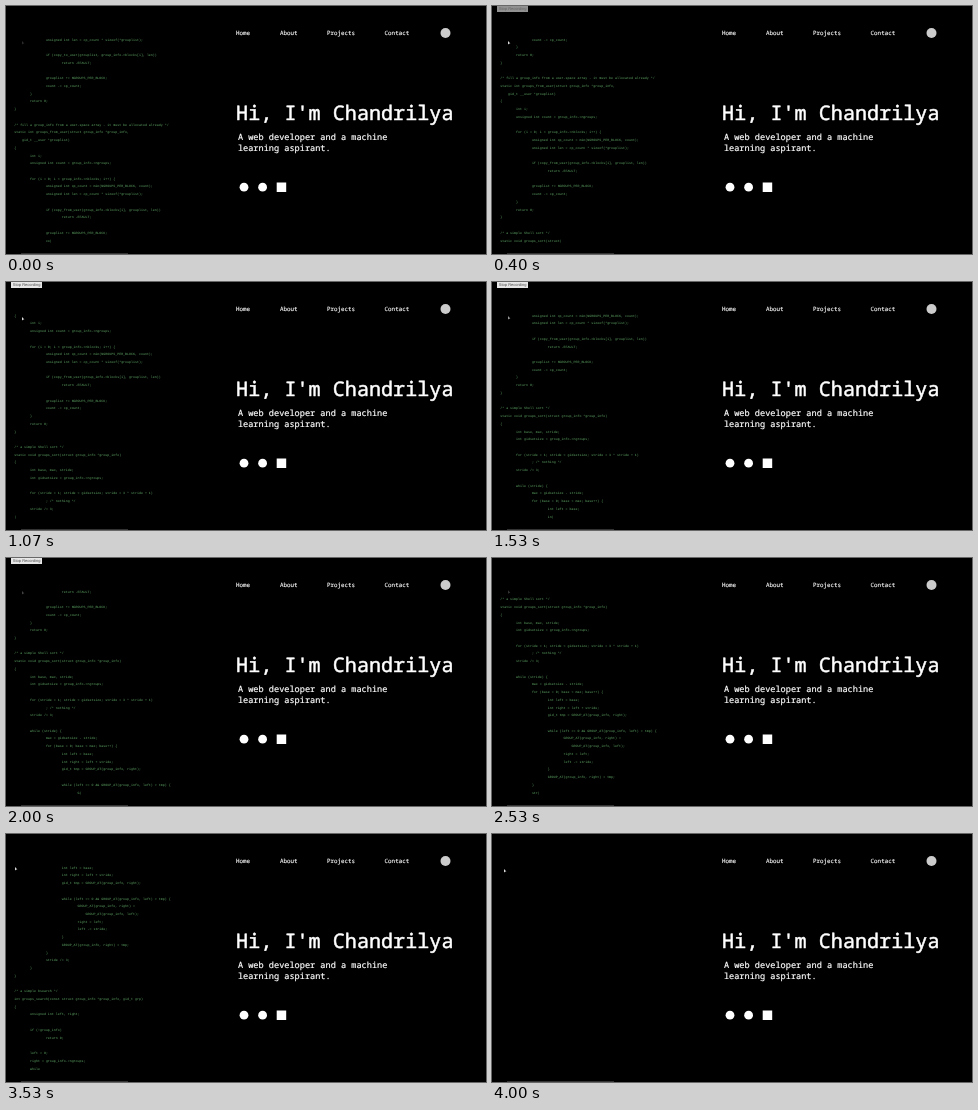
Animation of 480x248 px, one loop 4070 ms. Source, as an HTML page with a canvas:

```html
<!DOCTYPE html>
<html lang="en">
<head>
<meta charset="utf-8">
<title>Portfolio</title>
<style>
  html, body { margin: 0; width: 100%; height: 100%; overflow: hidden; background: #000; }
  canvas { display: block; }
</style>
</head>
<body>
<canvas id="stage" width="480" height="248"></canvas>
<script>
const ctx = document.getElementById('stage').getContext('2d');
const LOOP = 4070, TICK = 200 / 3;
const ROWS = 27, TOP = 34.6, PITCH = 7.73;
const MONO = '"Noto Sans Mono", monospace';
const COURIER = '"Liberation Mono", monospace';
const SANS = '"Liberation Sans", sans-serif';

const code = `\t\tunsigned int len = cp_count * sizeof(*grouplist);

\t\tif (copy_to_user(grouplist, group_info->blocks[i], len))
\t\t\treturn -EFAULT;

\t\tgrouplist += NGROUPS_PER_BLOCK;
\t\tcount -= cp_count;
\t}
\treturn 0;
}

/* fill a group_info from a user-space array - it must be allocated already */
static int groups_from_user(struct group_info *group_info,
    gid_t __user *grouplist)
{
\tint i;
\tunsigned int count = group_info->ngroups;

\tfor (i = 0; i < group_info->nblocks; i++) {
\t\tunsigned int cp_count = min(NGROUPS_PER_BLOCK, count);
\t\tunsigned int len = cp_count * sizeof(*grouplist);

\t\tif (copy_from_user(group_info->blocks[i], grouplist, len))
\t\t\treturn -EFAULT;

\t\tgrouplist += NGROUPS_PER_BLOCK;
\t\tcount -= cp_count;
\t}
\treturn 0;
}

/* a simple Shell sort */
static void groups_sort(struct group_info *group_info)
{
\tint base, max, stride;
\tint gidsetsize = group_info->ngroups;

\tfor (stride = 1; stride < gidsetsize; stride = 3 * stride + 1)
\t\t; /* nothing */
\tstride /= 3;

\twhile (stride) {
\t\tmax = gidsetsize - stride;
\t\tfor (base = 0; base < max; base++) {
\t\t\tint left = base;
\t\t\tint right = left + stride;
\t\t\tgid_t tmp = GROUP_AT(group_info, right);

\t\t\twhile (left >= 0 && GROUP_AT(group_info, left) > tmp) {
\t\t\t\tGROUP_AT(group_info, right) =
\t\t\t\t    GROUP_AT(group_info, left);
\t\t\t\tright = left;
\t\t\t\tleft -= stride;
\t\t\t}
\t\t\tGROUP_AT(group_info, right) = tmp;
\t\t}
\t\tstride /= 3;
\t}
}

/* a simple bsearch */
int groups_search(const struct group_info *group_info, gid_t grp)
{
\tunsigned int left, right;

\tif (!group_info)
\t\treturn 0;

\tleft = 0;
\tright = group_info->ngroups;
\twhile (left < right) {`;

const lines = code.split('\n');
const offset = (line, col) =>
  lines.slice(0, line).reduce((sum, s) => sum + s.length + 1, col);

const typed = [
  [1, offset(26, 4)], [5, offset(32, 30)], [13, offset(40, 0)], [24, offset(49, 5)],
  [30, offset(56, 5)], [36, offset(63, 24)], [40, offset(70, 6)]
];
// x, y, opacity
const mouse = [
  [1, 16, 35, 0.2], [5, 16, 35, 1], [13, 16, 35, 1], [24, 16, 33, 0.3], [33, 16, 32, 0.2],
  [36, 6, 64, 1], [38, 6, 64, 1], [40, 9, 33, 1], [46, 9, 33, 1], [48, 12, 35, 1]
];
const tooltip = [[3, 0], [5, 0.6], [6, 0.95], [24, 0.95], [26, 0]];
const CARET_OFF = 42, CLEARED = 44;

function track(keys, step) {
  const next = keys.findIndex(key => key[0] > step);
  if (next === 0) return keys[0].slice(1);
  if (next < 0) return keys[keys.length - 1].slice(1);
  const a = keys[next - 1], b = keys[next];
  const p = (step - a[0]) / (b[0] - a[0]);
  return a.slice(1).map((v, i) => v + (b[i + 1] - v) * p);
}

// Fonts are set ten times larger and scaled down to keep exact glyph spacing.
function text(str, x, y, size, family, color, outline = 0) {
  ctx.save();
  ctx.translate(x, y);
  ctx.scale(0.1, 0.1);
  ctx.font = `${size * 10}px ${family}`;
  ctx.textRendering = 'geometricPrecision';
  ctx.fillStyle = ctx.strokeStyle = color;
  ctx.fillText(str, 0, 0);
  if (outline) {
    ctx.lineWidth = outline * size * 10;
    ctx.lineJoin = 'round';
    ctx.strokeText(str, 0, 0);
  }
  ctx.restore();
}

const title = (str, x, y, size) => text(str, x, y, size, MONO, '#fff', 0.025);

function rect(x, y, w, h, color) {
  ctx.fillStyle = color;
  ctx.fillRect(x, y, w, h);
}

function disc(x, y, r, color) {
  ctx.fillStyle = color;
  ctx.beginPath();
  ctx.arc(x, y, r, 0, 2 * Math.PI);
  ctx.fill();
}

function drawCode(step) {
  if (step >= CLEARED) return;
  const count = Math.round(track(typed, step)[0]);
  const caret = step < CARET_OFF ? '|' : '';
  const visible = (code.slice(0, count) + caret).split('\n').slice(-ROWS);
  visible.forEach((line, row) =>
    text(line.replace(/\t/g, ' '.repeat(8)), 8.2, TOP + row * PITCH, 3.3, COURIER, '#62ac68'));
}

function drawMouse(step) {
  const [x, y, opacity] = track(mouse, step);
  ctx.globalAlpha = opacity;
  ctx.fillStyle = '#ddd';
  ctx.beginPath();
  ctx.moveTo(x, y);
  ctx.lineTo(x + 2.4, y + 2.5);
  ctx.lineTo(x + 1.3, y + 2.6);
  ctx.lineTo(x, y + 3.5);
  ctx.fill();
  ctx.globalAlpha = 1;
}

function drawTooltip(step) {
  ctx.globalAlpha = track(tooltip, step)[0];
  rect(5, 0, 31, 6, '#f4f4f4');
  text('Stop Recording', 6.8, 4.4, 4, SANS, '#444');
  ctx.globalAlpha = 1;
}

function drawPage() {
  const nav = { Home: 230, About: 274, Projects: 321, Contact: 378.6 };
  for (const label in nav) title(label, nav[label], 29.3, 5.85);
  disc(439.5, 27, 5, '#ccc');
  title("Hi, I'm Chandrilya", 230.1, 113.8, 20.13);
  title('A web developer and a machine', 231.9, 133.8, 8.59);
  title('learning aspirant.', 231.9, 144.8, 8.59);
  disc(238, 181.2, 4.4, '#fff');
  disc(256.6, 181.2, 4.4, '#fff');
  rect(270.7, 176.5, 9.5, 9.5, '#fff');
  rect(15, 247, 107, 1, '#333');
}

function draw(now) {
  const tick = Math.floor((now % LOOP + 3.4) / TICK);
  const step = tick - Math.floor((tick + 3) / 5);
  rect(0, 0, 480, 248, '#000');
  drawPage();
  drawCode(step);
  drawTooltip(step);
  drawMouse(step);
}

const start = performance.now();
function loop() {
  draw(performance.now() - start);
  requestAnimationFrame(loop);
}
loop();
</script>
</body>
</html>
```
